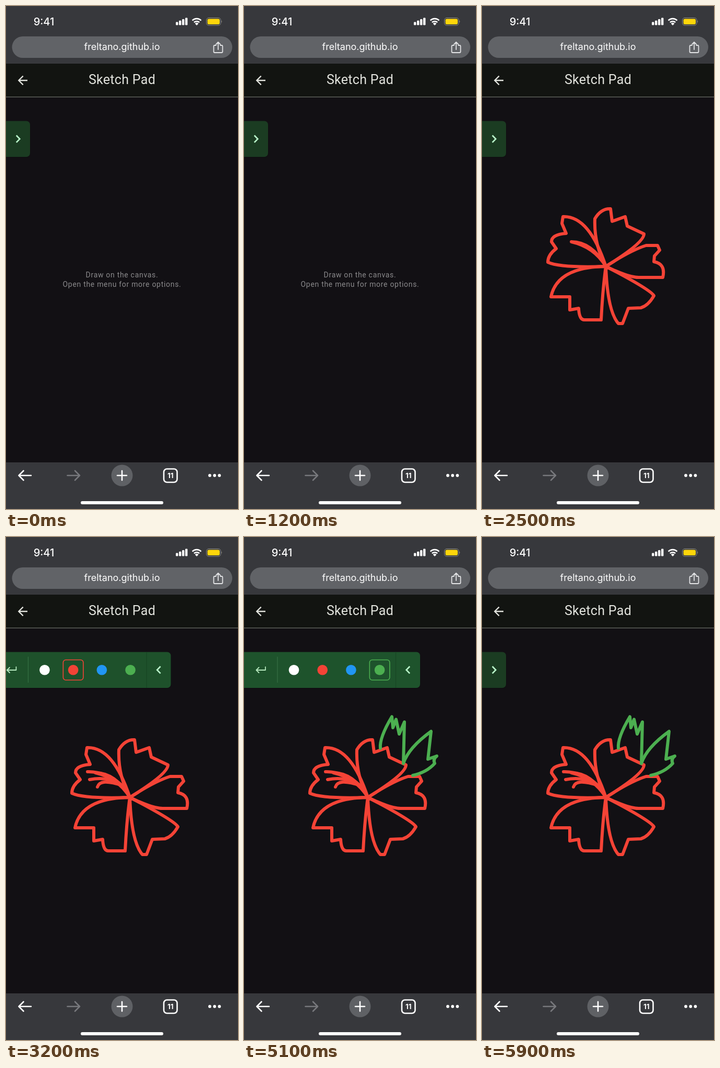
An HTML page for the animation above (6000 ms loop, 444 by 960 pixels).

```html
<!DOCTYPE html>
<html lang="en">
<head>
<meta charset="utf-8">
<title>Sketch Pad</title>
<style>
  html, body { margin: 0; width: 100%; height: 100%; overflow: hidden; background: #121014; }
  svg { display: block; width: 100%; height: 100%; }
  text { text-anchor: middle; font-family: Roboto, sans-serif; }
  .ui { font-family: Inter, sans-serif; fill: #fff; }
  .line { fill: none; stroke-linecap: round; stroke-linejoin: round; }
</style>
</head>
<body>
<svg viewBox="0 0 444 960">
  <rect width="444" height="960" fill="#121014"/>

  <g id="hint" fill="#8b8a8c" font-size="14" letter-spacing=".7">
    <text x="222" y="517.5">Draw on the canvas.</text>
    <text x="222" y="535.5">Open the menu for more options.</text>
  </g>
  <g id="sketch" class="line" stroke-width="6"></g>

  <g id="menu">
    <rect x="-20" y="221" width="357.5" height="68.5" rx="8" fill="#0c0d0e" opacity=".5"/>
    <rect id="panel" x="-20" y="219.5" width="357" height="68.5" rx="7"/>
    <path d="M64 228.5V278" stroke="#3a7548"/>
    <path d="M290.5 219.5V288" stroke="#184323"/>
    <path class="line" stroke="#b5e8bd" stroke-width="1.8" d="M41 248v6H24M28.5 249l-5 5 5 5"/>
    <g id="swatches"></g>
    <rect id="picked" y="234.5" width="38.5" height="38.5" rx="5" fill="none" stroke-width="1.6"/>
    <path id="chevron" fill="none" stroke="#b9f6ca" stroke-width="2.7" d="M310.8 247l6.5 6.7-6.5 6.7"/>
  </g>

  <rect width="444" height="110" fill="#37383c"/>
  <text class="ui" x="72.5" y="37" font-size="20" font-weight="500">9:41</text>
  <g id="signal" fill="#fff"></g>
  <path fill="#fff" d="M365 37l-3.4-3.6a5 5 0 0 1 6.8 0z"/>
  <path fill="none" stroke="#fff" stroke-width="2.6" d="M356.6 27.6a12 12 0 0 1 16.8 0M359.9 31.3a7.3 7.3 0 0 1 10.2 0"/>
  <rect x="383.5" y="22.5" width="27.5" height="14.5" rx="4.5" fill="none" stroke="#8b8b83"/>
  <rect x="385.5" y="24.5" width="23.5" height="10.5" rx="2.8" fill="#ffd60a"/>
  <path d="M412.3 27.5q2 2.2 0 4.5z" fill="#8b8b83"/>
  <rect x="11.5" y="58" width="421.5" height="41" rx="20.5" fill="#616367"/>
  <text class="ui" x="222" y="84" font-size="18">freltano.github.io</text>
  <path class="line" stroke="#e3e4e6" stroke-width="1.8"
    d="M402 75h-2.5q-2 0-2 2v10q0 2 2 2h13q2 0 2-2V77q0-2-2-2H410M406 83V69.5M402 73l4-4 4 4"/>

  <rect y="110" width="444" height="63.5" fill="#121411"/>
  <rect y="173" width="444" height="1.2" fill="#6c6f68"/>
  <path fill="none" stroke="#e2e3dd" stroke-width="2.3" d="M41 142H24.5M32.7 133.6l-8.4 8.4 8.4 8.4"/>
  <text x="222" y="149" font-size="25" letter-spacing=".3" fill="#e2e3dd">Sketch Pad</text>

  <rect y="871" width="444" height="89" fill="#37383c"/>
  <circle cx="222" cy="896" r="20.5" fill="#5f6165"/>
  <g class="line" stroke="#fff" stroke-width="2.6">
    <path d="M48 896H25M33.5 887l-9 9 9 9"/>
    <path stroke="#77787c" d="M117.5 896H140M132 887l9 9-9 9"/>
    <path d="M222 887v18M213 896h18"/>
    <rect x="302" y="883.5" width="25.5" height="25.5" rx="6"/>
  </g>
  <text class="ui" x="314.8" y="901" font-size="13.5" font-weight="700">11</text>
  <g id="dots" fill="#fff"></g>
  <rect x="143" y="945" width="158" height="6" rx="3" fill="#fff"/>
</svg>

<script>
const LOOP = 6000, STEP = 100;
const RED = '#f44336', GREEN = '#4caf50';
const $ = id => document.getElementById(id);

function add(parent, tag, attrs) {
  const el = document.createElementNS('http://www.w3.org/2000/svg', tag);
  for (const key in attrs) el.setAttribute(key, attrs[key]);
  return $(parent).appendChild(el);
}

for (let i = 0; i < 4; i++) {
  const height = 6 + 2.7 * i;
  add('signal', 'rect', { x: 325 + 6 * i, y: 36.5 - height, width: 4.4, height, rx: 1.3 });
}
for (let i = 0; i < 3; i++) add('dots', 'circle', { cx: 390 + 9.2 * i, cy: 896, r: 2.9 });

const swatchX = i => 95.5 + 54.7 * i;
['#fff', RED, '#2196f3', GREEN].forEach((fill, i) =>
  add('swatches', 'circle', { cx: swatchX(i), cy: 253.7, r: 9.8, fill }));

// Petals leave the heart of the flower, follow a ragged rim and come back.
const HEART = '237 497';
const petal = (side, rim, back) => `M${HEART}Q${side} ${rim}Q${back} ${HEART}`;
const stamen = (bend, tip) => `M222 474Q${bend} ${tip}`;

const flower = [
  petal('214 455', '216 406Q228 386 246 387L249 411 274 402 278 420 310 435', '310 452'),
  petal('205 400', '155 402L153 415 161 434Q133 436 133 450L142 463Q126 475 126 489', '150 500'),
  petal('144 498', '132 555L168 555 168 580 185 577Q186 599 196 599L228 599', '231 540'),
  petal('240 582', '261 606L269 606 280 577 304 576Q318 572 329 553', '322 541'),
  petal('280 518', '300 518L346 518Q352 492 329 488L330 477 340 466 336 457 314 457', '285 466'),
  petal('210 450', '171 450', '215 460')
];
const stamens = [stamen('190 447', '156 448'), stamen('195 456', '160 463'), stamen('180 460', '175 477')];
const leaves = [
  'M261 403Q259 383 283 343L285 364 291 348 297 376 307 353 305 432',
  'M305 432Q315 402 358 371L352 424 369 418Q361 424 365 432 350 449 323 455'
];

// Draws the paths one after another at an even pen speed.
function sequence(paths, stroke, start, end) {
  const els = paths.map(d => add('sketch', 'path', { d, stroke, pathLength: 1, 'stroke-dasharray': '1 2' }));
  const lengths = els.map(el => el.getTotalLength());
  const pace = (end - start) / lengths.reduce((a, b) => a + b);
  return els.map((el, i) => {
    const from = start;
    start += lengths[i] * pace;
    return { el, from, to: start };
  });
}
const strokes = [
  ...sequence(flower, RED, 1350, 2500),
  ...sequence(stamens, RED, 2620, 2900),
  ...sequence(leaves, GREEN, 4520, 5100)
];

const ramp = (t, from, to) => Math.max(0, Math.min(1, (t - from) / (to - from)));
const ease = x => x * x * (3 - 2 * x);
const mix = (a, b, k) => `rgb(${a.map((v, i) => Math.round(v + (b[i] - v) * k))})`;

function draw(t) {
  for (const { el, from, to } of strokes) {
    const shown = ramp(t, from, to);
    el.style.visibility = shown > 0 ? 'visible' : 'hidden';
    el.style.strokeDashoffset = 1 - shown;
  }
  $('hint').style.visibility = t < 1400 ? 'visible' : 'hidden';

  const open = ease(ramp(t, 2950, 3250)) - ease(ramp(t, 5400, 5700));
  $('menu').setAttribute('transform', `translate(${-291 * (1 - open)})`);
  $('panel').setAttribute('fill', mix([27, 60, 34], [30, 83, 44], open));
  $('chevron').setAttribute('transform', open > .5 ? 'rotate(180 314 253.7)' : '');

  const green = t >= 3500;
  $('picked').setAttribute('x', swatchX(green ? 3 : 1) - 19.25);
  $('picked').setAttribute('stroke', green ? GREEN : RED);
}

const origin = performance.now();
function tick() {
  const t = (performance.now() - origin) % LOOP;
  draw(Math.floor(t / STEP) * STEP);
  requestAnimationFrame(tick);
}
tick();
</script>
</body>
</html>
```
